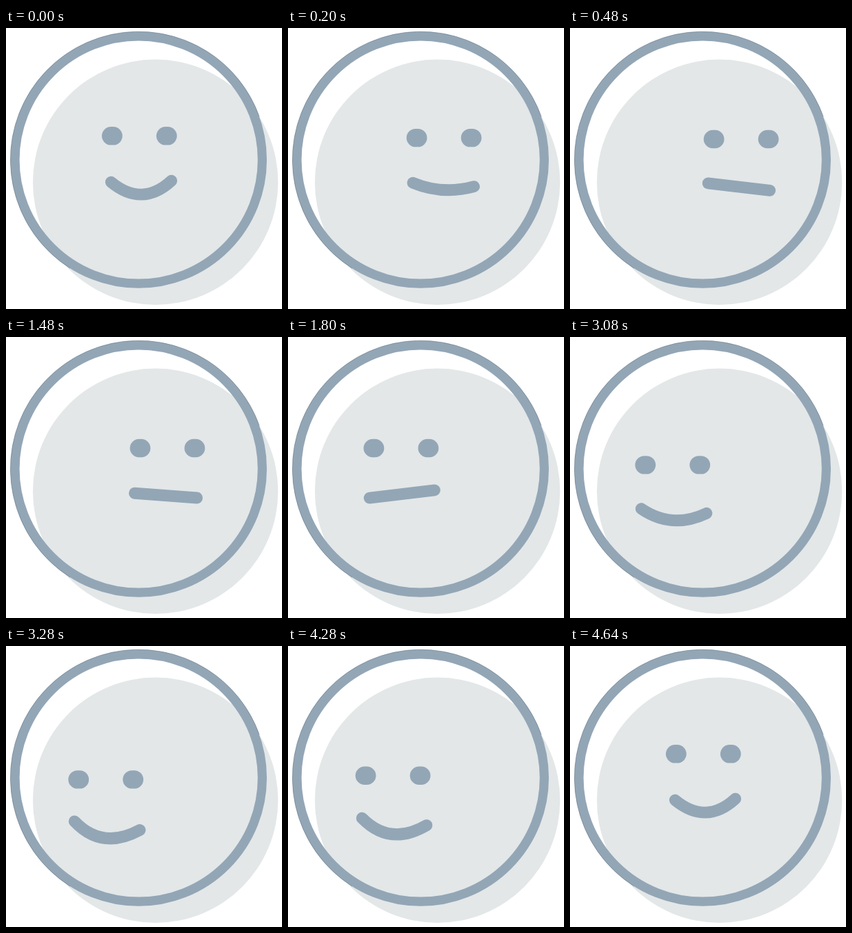
Recreate the animation shown at these times as an HTML page with a canvas. Size 400 by 407 pixels, loop 6.64 s.

```html
<!DOCTYPE html>
<html lang="en">
<head>
<meta charset="utf-8">
<title>Smiley looking around</title>
<style>
  html, body { margin: 0; width: 100%; height: 100%; overflow: hidden; background: #fff; }
  canvas { display: block; }
</style>
</head>
<body>
<canvas id="stage" width="400" height="407"></canvas>
<script>
const ctx = document.getElementById('stage').getContext('2d');
const LOOP = 6640, STEP = 40;
const INK = '#93a6b6', EDGE = '#6f808f', FILL = '#e3e7e8';
const RING = { x: 192.2, y: 191, r: 179.2, width: 13.2 };
const EYE_GAP = 79, EYE_W = 29.8, EYE_H = 26.4;

// eyeX, eyeY: midpoint between the eyes. x, y: middle of the mouth.
// half: half its width, tilt: drop of its right end, bend: depth of the smile.
const front = { eyeX: 193.3, eyeY: 156.3, x: 196, y: 222.2, half: 43.7, tilt: -1, bend: 37.8 };
const right = { eyeX: 248.1, eyeY: 161, x: 244.9, y: 230.1, half: 44.7, tilt: 5.2, bend: 0 };
const left = { eyeX: 161, eyeY: 161, x: 162.5, y: 227.4, half: 47.2, tilt: -6, bend: 0 };
const down = { eyeX: 144.7, eyeY: 193.4, x: 146.6, y: 260.2, half: 47.4, tilt: 6.3, bend: 36 };

const moves = [
  { to: right, start: 38, end: 480 },
  { to: left, start: 1443, end: 1880 },
  { to: down, start: 2879, end: 3280 },
  { to: front, start: 4249, end: 4640 }
];

const easeOut = p => 1 - (1 - p) ** 2;

function mix(a, b, k) {
  const pose = {};
  for (const key in a) pose[key] = a[key] + (b[key] - a[key]) * k;
  return pose;
}

function poseAt(t) {
  let pose = front;
  for (const { to, start, end } of moves) {
    if (t < start) break;
    pose = mix(pose, to, easeOut(Math.min(1, (t - start) / (end - start))));
  }
  return pose;
}

function drawHead() {
  ctx.fillStyle = FILL;
  ctx.beginPath();
  ctx.arc(216.6, 223.3, 177.7, 0, Math.PI * 2);
  ctx.fill();

  ctx.strokeStyle = INK;
  ctx.lineWidth = RING.width;
  ctx.beginPath();
  ctx.arc(RING.x, RING.y, RING.r, 0, Math.PI * 2);
  ctx.stroke();

  // Thin dark rim where the ring borders on white
  ctx.strokeStyle = EDGE;
  ctx.lineWidth = 0.7;
  ctx.beginPath();
  ctx.arc(RING.x, RING.y, RING.r + RING.width / 2, Math.PI * 0.68, Math.PI * 1.89);
  ctx.stroke();
}

function drawEyes({ eyeX, eyeY }) {
  ctx.fillStyle = INK;
  for (const side of [-0.5, 0.5]) {
    ctx.beginPath();
    ctx.roundRect(eyeX + side * EYE_GAP - EYE_W / 2, eyeY - EYE_H / 2, EYE_W, EYE_H, EYE_H / 2);
    ctx.fill();
  }
}

function drawMouth({ x, y, half, tilt, bend }) {
  ctx.strokeStyle = INK;
  ctx.lineWidth = 16.9;
  ctx.lineCap = 'round';
  ctx.beginPath();
  ctx.moveTo(x - half, y - tilt);
  // The curve leans away from its lower end
  ctx.quadraticCurveTo(x - bend * tilt / 30, y + bend, x + half, y + tilt);
  ctx.stroke();
}

function draw(t) {
  const pose = poseAt(t);
  ctx.fillStyle = '#fff';
  ctx.fillRect(0, 0, 400, 407);
  drawHead();
  drawEyes(pose);
  drawMouth(pose);
}

const begin = performance.now();

function tick() {
  const t = (performance.now() - begin) % LOOP;
  draw(Math.floor(t / STEP) * STEP);
  requestAnimationFrame(tick);
}
tick();
</script>
</body>
</html>
```
